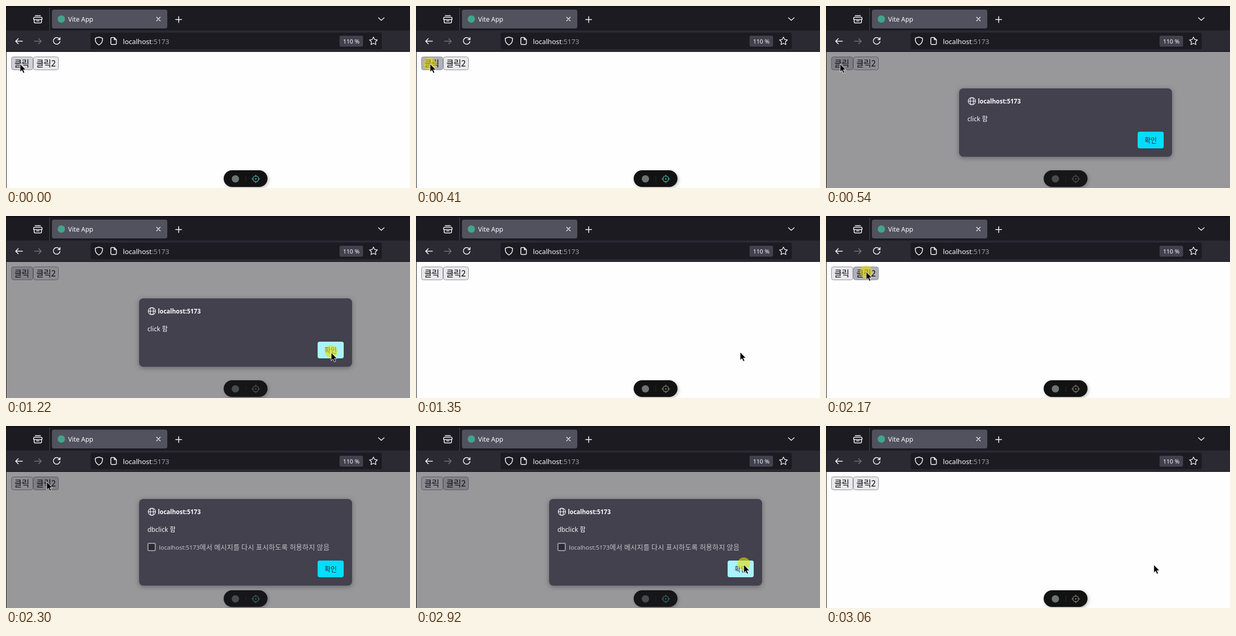
An HTML page that plays this animation: 774 by 349 pixels, repeating every 3.59 s.

```html
<!DOCTYPE html>
<html lang="ko">
<head>
<meta charset="utf-8">
<title>Vite App</title>
<style>
  html, body { margin: 0; width: 100%; height: 100%; overflow: hidden; background: #fff; }
  svg { display: block; width: 774px; height: 349px; }
  text { font-family: "Noto Sans", "Noto Sans CJK KR", "Noto Sans CJK", sans-serif; white-space: pre; }
  .icon { fill: none; stroke: #fbfbfe; stroke-width: 1.5; stroke-linecap: round; stroke-linejoin: round; }
  #pill { filter: drop-shadow(2px 2px 3px rgba(60, 60, 40, .35)); }
  #panel { filter: drop-shadow(0 2px 5px rgba(20, 20, 28, .4)); }
</style>
</head>
<body>
<svg viewBox="0 0 774 349">
  <rect width="774" height="349" fill="#fefefe"/>

  <!-- page -->
  <g stroke="#8f8f9d">
    <rect id="btn1" x="10.5" y="97.5" width="41" height="25" rx="4"/>
    <rect id="btn2" x="52.5" y="97.5" width="48" height="25" rx="4"/>
  </g>
  <g font-size="15.5">
    <text x="16" y="116">클릭</text>
    <text x="58" y="116">클릭2</text>
  </g>
  <g id="pill">
    <rect x="417" y="315" width="84" height="32" rx="16" fill="#121212"/>
  </g>
  <circle cx="439.5" cy="331.5" r="7" fill="#6c7474"/>
  <path d="M459.5 326v11" stroke="#2c2c2c"/>
  <g id="aim" fill="none" stroke-width="1.5">
    <circle cx="478.5" cy="331.5" r="5.6"/>
    <path d="M478.5 323.5v4M478.5 335.5v4M470.500 331.5h4M482.500 331.5h4"/>
    <circle cx="478.5" cy="331.5" r=".8"/>
  </g>

  <rect id="shade" x="1" y="88" width="773" height="261" fill="rgba(28,27,34,.45)"/>

  <!-- browser bars -->
  <rect width="774" height="47" fill="#1c1b22"/>
  <rect width="774" height="3" fill="#121217"/>
  <rect y="47" width="774" height="40" fill="#2b2a33"/>
  <rect y="87" width="774" height="1" fill="#0d0d11"/>
  <rect width="1" height="349" fill="#17161c"/>
  <path d="M83.500 3v44" stroke="#47464f"/>
  <rect x="88" y="7" width="221" height="36" rx="4" fill="#52525e"/>
  <circle cx="106" cy="25" r="7" fill="#41a58a"/>
  <text x="119" y="30" font-size="12.3" fill="#fbfbfe">Vite App</text>
  <rect x="162" y="51" width="558" height="32" rx="4" fill="#1c1b22"/>
  <text x="224" y="73" font-size="13.1" fill="#fbfbfe">localhost<tspan fill="#9c9ba3">:5173</tspan></text>
  <rect x="639" y="57" width="45" height="21" rx="3" fill="#42414d"/>
  <text x="661.5" y="72" font-size="11.2" fill="#fbfbfe" text-anchor="middle">110 %</text>
  <g class="icon">
    <path d="M56 18.500h10M55 21.500h12q2 0 2 2v2.500h-16v-2.500q0-2 2-2zM54 26v4.500q0 2 2 2h10q2 0 2-2V26M58.500 28.500h5"/>
    <path d="M288.500 21.500l7 7m0-7l-7 7" stroke-width="1.2"/>
    <path d="M325 26h11.500M330.800 20.300v11.500"/>
    <path d="M713.500 22.500l5.500 5 5.500-5" stroke-width="1.4"/>
    <path d="M31.500 67.500h-13m5-5l-5 5 5 5"/>
    <path d="M54.500 67.500h13m-5-5l5 5-5 5" stroke="#74737b"/>
    <path d="M102.500 63.500a6.400 6.400 0 1 0 .9 4.500M103.500 60.500v4h-4"/>
    <path d="M178 59.500l6.800 2.200v3.300c0 4.500-2.600 7.600-6.800 9.800c-4.200-2.200-6.800-5.300-6.800-9.800v-3.300z"/>
    <path d="M202.500 60.500h5l4 4v7.500q0 1.700-1.700 1.700h-7.300q-1.700 0-1.700-1.700v-9.800q0-1.700 1.700-1.700zM207.500 60.500v4h4"/>
    <path id="star" stroke-width="1.3"/>
  </g>

  <!-- alert box -->
  <g id="dialog">
    <g id="panel"><rect id="body" x="255" width="408" rx="8" fill="#42414d"/></g>
    <g class="icon" stroke-width="1" style="stroke-width:1.2">
      <circle cx="279.500" cy="24.500" r="7"/>
      <ellipse cx="279.500" cy="24.500" rx="3.200" ry="7"/>
      <path d="M272.500 24.500h14"/>
    </g>
    <g fill="#fbfbfe">
      <text x="291" y="29" font-size="11.5" font-weight="700">localhost:5173</text>
      <text id="msg" x="271" y="63" font-size="12.2"></text>
    </g>
    <g id="option" fill="#c4c3c9">
      <rect x="272" y="85" width="14" height="14" rx="2" fill="#2b2a33" stroke="#9a99a3" stroke-width="2"/>
      <text x="293" y="97" font-size="11.5">localhost:5173</text>
      <text x="371" y="97" font-size="13" letter-spacing=".2">에서 메시지를 다시 표시하도록 허용하지 않음</text>
    </g>
    <g id="ok">
      <rect id="okFace" x="597" width="50" height="32" rx="4"/>
      <text x="622" y="20.500" font-size="12.8" fill="#2b2a33" text-anchor="middle">확인</text>
    </g>
  </g>

  <circle id="glow" r="12" fill="#e6dc00" fill-opacity=".6"/>
  <path id="cursor" d="M0 0v15.500l3.500-3.200 2.500 5.500 2.700-1.200-2.500-5.300h4.800z" fill="#000" stroke="#fff" stroke-width=".9"/>
</svg>

<script>
const LOOP = 3590, TICK = 70;
const $ = id => document.getElementById(id);
const set = (id, attrs) => { for (const k in attrs) $(id).setAttribute(k, attrs[k]); };
const show = (id, on) => set(id, { visibility: on ? "inherit" : "hidden" });
const within = (t, a, b) => t >= a && t < b;

const BTN = { idle: "#e9e9ed", hover: "#d0d0d7", active: "#b1b1b9" };
const OK = { idle: "#00ddff", hover: "#80ebff", active: "#aaf2ff" };

// start time, number of ticks, end point
const moves = [
  [740, 5, [622, 262]],
  [1220, 1, [623, 262]],
  [1350, 1, [621, 261]],
  [1420, 4, [77, 107]],
  [2300, 1, [78, 107]],
  [2640, 4, [628, 266]]
];
const clicks = [[340, 470], [1220, 1350], [2030, 2100], [2170, 2300], [2920, 2990]];

const ease = p => p * p * (3 - 2 * p);

function pointer(t) {
  let at = [27, 111];
  for (const [start, ticks, to] of moves) {
    if (t < start) break;
    const p = ease(Math.min(1, (Math.floor((t - start) / TICK) + 1) / ticks));
    at = at.map((v, i) => Math.round(v + (to[i] - v) * p));
  }
  return at;
}

function drawDialog(t) {
  const first = within(t, 470, 1350), second = within(t, 2300, 3060);
  const open = first || second;
  show("shade", open);
  show("dialog", open);
  show("option", second);
  set("dialog", { transform: `translate(0 ${second ? 140 : 158})` });
  set("body", { height: second ? 166 : 131 });
  set("ok", { transform: `translate(0 ${second ? 118 : 83})` });
  $("msg").textContent = second ? "dbclick 함" : "click 함";
  return open;
}

function render(t) {
  const [x, y] = pointer(t);
  const down = clicks.some(([a, b]) => within(t, a, b));
  const open = drawDialog(t);
  const state = over => over ? (down ? "active" : "hover") : "idle";
  const inBar = y > 97 && y < 123;

  // a button that opened the alert keeps its hover look
  const held1 = within(t, 470, 1350), held2 = within(t, 2300, 3060);
  set("btn1", { fill: BTN[held1 ? "hover" : state(!open && inBar && x < 52)] });
  set("btn2", { fill: BTN[held2 ? "hover" : state(!open && inBar && x >= 52 && x < 101)] });
  set("okFace", { fill: OK[state(x > 597 && x < 647 && y > 241)] });

  const lit = t < 540 || within(t, 2300, 3060);
  set("aim", { stroke: lit ? "#3f9d92" : "#77746a" });

  show("glow", down);
  set("glow", { cx: x, cy: y - (open ? 2 : 0) });
  set("cursor", { transform: `translate(${x} ${y})` });
}

const star = Array.from({ length: 10 }, (_, i) => {
  const a = (i / 5 - .5) * Math.PI, r = i % 2 ? 4 : 8;
  return `${704 + r * Math.cos(a)} ${67.5 + r * Math.sin(a)}`;
});
set("star", { d: `M${star.join("L")}z` });

const begin = performance.now();
function loop() {
  render((performance.now() - begin) % LOOP);
  requestAnimationFrame(loop);
}
loop();
</script>
</body>
</html>
```
